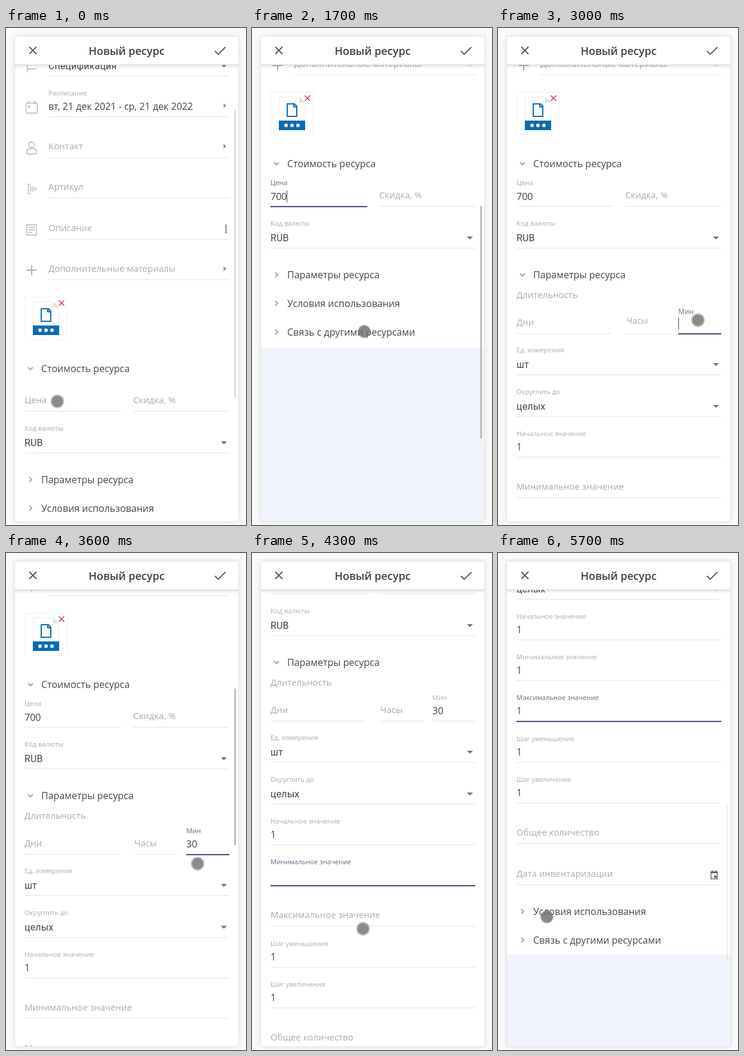
Recreate the animation shown at these times as an HTML page with a canvas. Size 402 by 832 pixels, loop 5.8 s.

```html
<!DOCTYPE html>
<html lang="ru">
<head>
<meta charset="utf-8">
<style>
  html, body { margin: 0; width: 100%; height: 100%; overflow: hidden; background: #fdfdfd; }
  canvas { display: block; width: 402px; height: 832px; }
</style>
</head>
<body>
<canvas id="stage"></canvas>
<script>
const LOOP = 5800, WIDTH = 402, HEIGHT = 832;
const canvas = document.getElementById('stage');
const ctx = canvas.getContext('2d');
const dpr = window.devicePixelRatio || 1;
canvas.width = WIDTH * dpr;
canvas.height = HEIGHT * dpr;

const SANS = '"Open Sans", "Noto Sans", sans-serif';
const SELECT = 'Roboto, sans-serif';
const HINT = '#ababab', VALUE = '#444', HEADING = '#464646', RULE = '#e3e3e3';
const ICON = '#b4b4b4', FOCUS = '#4b4672', BLUE = '#0a6bb5';
const HINT_SIZE = 15, LABEL_SIZE = 11.25;

// Each key is [time, ...values].
const SCROLL = [[1300, 0], [1700, 343], [3500, 343], [3600, 350], [3900, 573],
  [4600, 573], [4800, 802], [5200, 802], [5500, 916]];
const BAR = [[0, .5], [200, 0], [1300, 0], [1400, 1], [1800, 1], [2000, 0], [3500, 0], [3600, 1],
  [3900, 1], [4200, 0], [4600, 0], [4700, 1], [4900, 1], [5100, 0], [5200, 0], [5300, 1], [5500, 1], [5700, .2]];
const POINTER = [[0, 86, 625], [600, 86, 625], [1200, 190, 628], [1300, 190, 628], [1700, 188, 508],
  [2000, 62, 415], [2600, 62, 415], [2750, 250, 489], [2900, 335, 489], [3200, 335, 489], [3600, 321, 520],
  [3900, 240, 330], [4100, 190, 540], [4300, 186, 629], [4600, 186, 629], [4800, 164, 599],
  [5200, 150, 700], [5500, 100, 600], [5700, 82, 609]];
const EXPAND = [[2050, 0], [2300, 1]];

const clamp = v => Math.max(0, Math.min(1, v));
const ease = v => v * v * (3 - 2 * v);

function at(keys, t) {
  if (t <= keys[0][0]) return keys[0].slice(1);
  const next = keys.findIndex(key => key[0] > t);
  if (next < 0) return keys[keys.length - 1].slice(1);
  const [from, to] = [keys[next - 1], keys[next]];
  const k = ease((t - from[0]) / (to[0] - from[0]));
  return from.slice(1).map((v, i) => v + (to[i + 1] - v) * k);
}

function text(str, x, y, color, size = 16, family = SANS, weight = 400) {
  ctx.font = `${weight} ${size}px ${family}`;
  ctx.letterSpacing = family === SELECT ? '.15px' : '0px';
  ctx.fillStyle = color;
  ctx.fillText(str, x, y + size * .36);
}

function rect(x, y, w, h, color) {
  ctx.fillStyle = color;
  ctx.fillRect(x, y, w, h);
}

function path(d, color, width = 1.3, x = 0, y = 0) {
  ctx.save();
  ctx.translate(x, y);
  ctx.strokeStyle = color;
  ctx.lineWidth = width;
  ctx.stroke(new Path2D(d));
  ctx.restore();
}

function shape(d, color, x = 0, y = 0) {
  ctx.save();
  ctx.translate(x, y);
  ctx.fillStyle = color;
  ctx.fill(new Path2D(d));
  ctx.restore();
}

function circle(x, y, r, color) {
  ctx.fillStyle = color;
  ctx.beginPath();
  ctx.arc(x, y, r, 0, 7);
  ctx.fill();
}

const rightArrow = y => shape('M0-4L4.5 0L0 4Z', '#8f8f8f', 364.5, y);
const downArrow = y => shape('M-5-2.5H5L0 2.5Z', '#757575', 365, y);

function heading(label, y, open = 0) {
  path(open ? 'M-4-2L0 2L4-2' : 'M-2-4L2 0L-2 4', '#a6a6a6', 2, 41, y);
  text(label, 59, y, HEADING);
}

// y is the underline; an empty field shows its label as a hint until it gets focus.
function field(t, label, y, options = {}) {
  const { x = 31, w = 343, value = '', valueY = -17, focus = Infinity, blur = Infinity,
    typed = [], caret = false, select = false } = options;
  const shown = typed.length ? value.slice(0, typed.filter(time => t >= time).length) : value;
  const active = t >= focus && t < blur;
  const rise = ease(clamp((t - focus) / 200));
  const fall = value ? 0 : ease(clamp((t - blur) / 200));
  const floated = value && !typed.length ? 1 : rise - fall;
  const hintY = -18.5, labelY = select ? -41.5 : -40;
  text(label, x, y + hintY + (labelY - hintY) * floated, active ? '#6a6785' : HINT,
    HINT_SIZE + (LABEL_SIZE - HINT_SIZE) * floated);
  if (shown) text(shown, x, y + valueY, VALUE, 16, select ? SELECT : SANS);
  rect(x, y - .5, w, active ? 2 : 1, active ? FOCUS : RULE);
  if (active && caret && (t - focus) % 1000 < 500) {
    ctx.font = '16px ' + SANS;
    rect(x + Math.round(ctx.measureText(shown).width), y - 26.5, 1, 20, FOCUS);
  }
  if (select) downArrow(y - 17);
}

function fileTile() {
  path('M34 450.5H99Q102.5 450.5 102.5 454V518Q102.5 521.5 99 521.5H34Q31.5 521.5 31.5 518V454Q31.5 450.5 34 450.5Z', '#f0f0f0', 1);
  path('M45.5 514V458.5H79L88.5 468V514', '#ececec', 1);
  shape('M79 458L89 468H79Z', '#e4e4e4');
  path('M59 470H71L75 474V491H59ZM70 470V475H75', BLUE, 2);
  rect(45, 498, 44, 16, BLUE);
  for (const x of [57, 67, 77]) circle(x, 506, 3, '#fff');
  path('M88.5 456L97.5 465M97.5 456L88.5 465', '#d8323a', 1.4);
}

function detailsSection(t) {
  const detail = { x: 71, w: 303 };
  field(t, 'Тип', 80.5, { ...detail, value: 'Спецификация', select: true });
  field(t, 'Расписание', 148.5, { ...detail, value: 'вт, 21 дек 2021 - ср, 21 дек 2022' });
  field(t, 'Контакт', 216.5, detail);
  field(t, 'Артикул', 284.5, detail);
  field(t, 'Описание', 353.5, detail);
  field(t, 'Дополнительные материалы', 421.5, detail);
  for (const y of [130, 198, 403]) rightArrow(y);
  rect(367, 329, 3, 15, '#a9a9a9');

  path('M35.5 54V74M35.5 68.5H51', ICON);
  path('M36 125.5H50Q52.5 125.5 52.5 128V140Q52.5 142.5 50 142.5H36Q33.5 142.5 33.5 140V128Q33.5 125.5 36 125.5ZM38 122V127M48 122V127', ICON);
  rect(37, 130, 3, 3, ICON);
  path('M38 195.5a5 4.5 0 1 0 10 0a5 4.5 0 1 0-10 0M35 208Q35 202 40 202H46Q51 202 51 208Q51 211 48 211H38Q35 211 35 208Z', ICON);
  path('M41 261.5H37.5V277.5H41M41.5 265V274M44.5 265V274M47.5 266V273M50 267V272', ICON);
  path('M35 329.5H51V346.5H35ZM38 334H48M38 338H48M38 342H44', ICON);
  path('M43 397V414M34.5 405.5H51.5', '#a8a8a8', 1.8);
}

function parameters(t) {
  text('Длительность', 31, 790, HINT, HINT_SIZE);
  field(t, 'Дни', 854.5, { w: 160 });
  field(t, 'Часы', 854.5, { x: 215, w: 73, focus: 2650, blur: 2850 });
  field(t, 'Мин', 854.5, { x: 302, w: 72, value: '30', focus: 2850, blur: 4100, typed: [3200, 3300], caret: true });
  field(t, 'Ед. измерения', 923.5, { value: 'шт', select: true });
  field(t, 'Округлить до', 993.5, { value: 'целых', select: true });
  field(t, 'Начальное значение', 1061.5, { value: '1' });
  field(t, 'Минимальное значение', 1129.5, { value: '1', focus: 4100, blur: 4500, typed: [4400] });
  field(t, 'Максимальное значение', 1197.5, { value: '1', focus: 4500, typed: [4600] });
  field(t, 'Шаг уменьшения', 1266.5, { value: '1' });
  field(t, 'Шаг увеличения', 1334.5, { value: '1' });
  field(t, 'Общее количество', 1402.5);
  field(t, 'Дата инвентаризации', 1471.5);
  path('M356.7 1450H367.3V1461.5H356.7ZM359 1447V1450M365 1447V1450', '#666', 1.4);
  rect(356, 1449, 12, 3, '#666');
  rect(362, 1456, 4, 4, '#666');
}

function form(t, scroll) {
  const opened = at(EXPAND, t)[0];
  const shift = 712 * opened;
  ctx.save();
  ctx.beginPath();
  ctx.rect(15, 62, 374, 764);
  ctx.clip();
  ctx.translate(0, -scroll);
  rect(15, 0, 374, 878 + shift - 2 * opened, '#fff');
  detailsSection(t);
  fileTile();
  heading('Стоимость ресурса', 570, 1);
  field(t, 'Цена', 641.5, { w: 162, value: '700', valueY: -16, focus: 300, blur: 2050, typed: [700, 900, 1000], caret: true });
  field(t, 'Скидка, %', 641.5, { x: 213, w: 161 });
  field(t, 'Код валюты', 711.5, { value: 'RUB', select: true });
  heading('Параметры ресурса', 756, opened > 0);
  if (opened) {
    ctx.save();
    ctx.beginPath();
    ctx.rect(15, 776, 374, shift);
    ctx.clip();
    parameters(t);
    ctx.restore();
  }
  heading('Условия использования', 804 + shift);
  heading('Связь с другими ресурсами', 852 + shift);
  ctx.restore();
}

function scrollbar(t, scroll) {
  const [height, ratio] = t < 300 ? [482, .576] : t < 2050 ? [389, .497] : [262, .342];
  ctx.globalAlpha = at(BAR, t)[0];
  rect(382.5, 62 + (scroll + 132) * ratio, 2.5, height, '#b0b0b0');
  ctx.globalAlpha = 1;
}

function header() {
  const shade = ctx.createLinearGradient(0, 62, 0, 68);
  shade.addColorStop(0, 'rgba(0,0,0,.1)');
  shade.addColorStop(1, 'rgba(0,0,0,0)');
  rect(15, 62, 374, 6, shade);
  rect(15, 14, 374, 48, '#fff');
  rect(15, 61, 374, 1, '#dadada');
  path('M39 31.5L51 43.5M51 31.5L39 43.5', '#555', 1.8);
  path('M350 38.5L355.5 44L367.5 32', '#555', 1.8);
  ctx.textAlign = 'center';
  text('Новый ресурс', 202, 38.5, '#404040', 18, SANS, 600);
  ctx.textAlign = 'left';
}

function pointer(t) {
  const [x, y] = at(POINTER, t);
  const dragging = (t >= 1400 && t < 1800) || t >= 5300;
  if (dragging) {
    circle(x, y, 11.5, 'rgba(120,120,120,.3)');
    circle(x, y, 10, 'rgba(110,110,110,.75)');
  } else {
    circle(x, y, 11.5, '#c6c6c6');
    circle(x, y, 9.5, '#8b8b8b');
  }
}

function draw(t) {
  ctx.setTransform(dpr, 0, 0, dpr, 0, 0);
  rect(0, 0, WIDTH, HEIGHT, '#fdfdfd');
  ctx.save();
  ctx.shadowColor = 'rgba(0,0,0,.1)';
  ctx.shadowBlur = 14 * dpr;
  rect(14, 14, 376, 812, '#fff');
  ctx.restore();
  rect(15, 14, 374, 812, '#f0f4fc');
  const scroll = at(SCROLL, t)[0];
  form(t, scroll);
  scrollbar(t, scroll);
  header();
  path('M14.5 13.5H389.5V826.5H14.5Z', '#dfe1e4', 1);
  pointer(t);
}

const start = performance.now();
function tick() {
  draw((performance.now() - start) % LOOP);
  requestAnimationFrame(tick);
}
tick();
</script>
</body>
</html>
```
